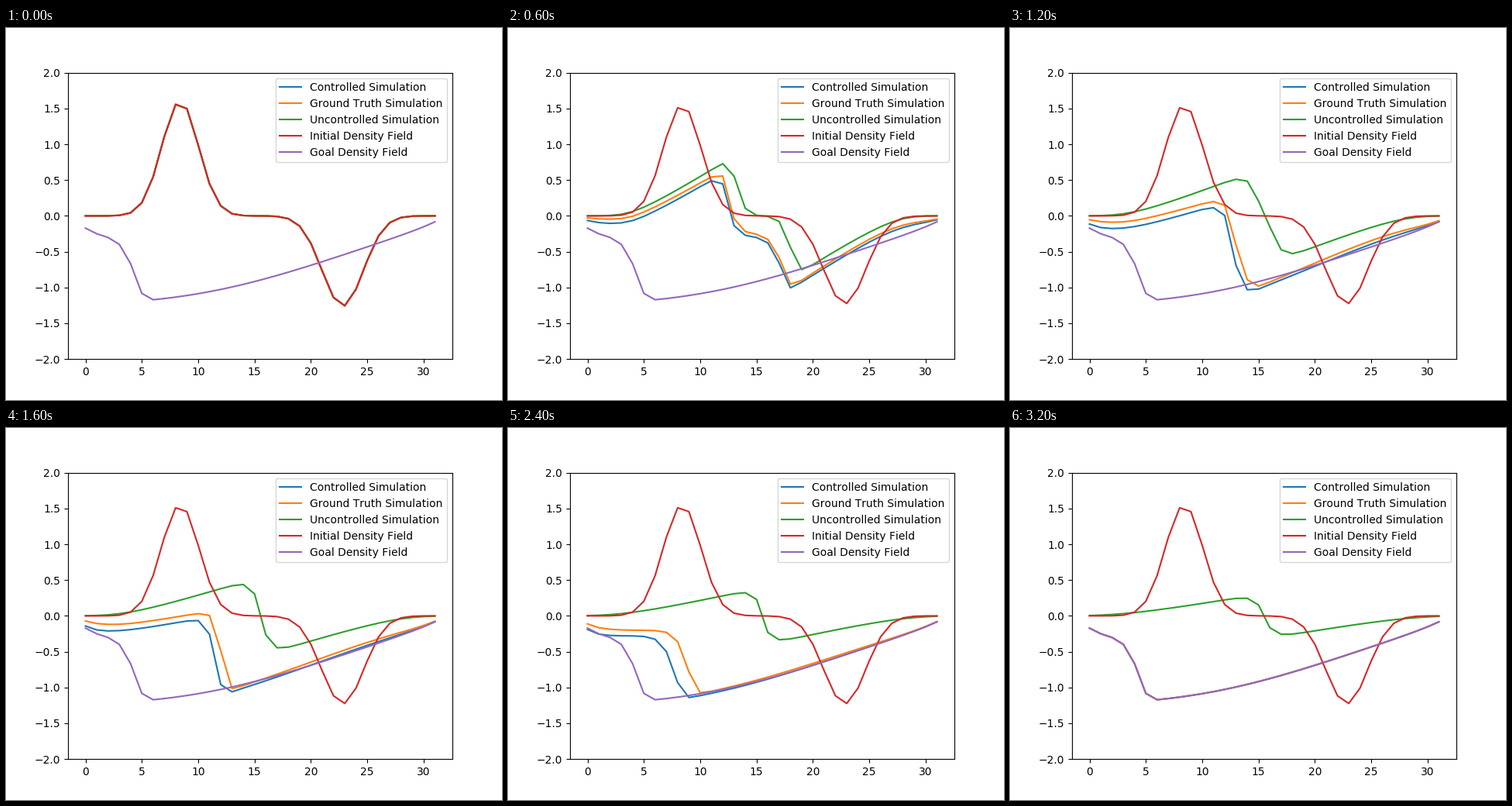
Recreate the animation shown at these times as a matplotlib script. Size 640x480 px, loop 3300 ms.

```python
import numpy as np
import matplotlib.pyplot as plt
from matplotlib.animation import FuncAnimation

plt.rcParams["text.kerning_factor"] = 6  # wider letter spacing

# Viscous Burgers equation on 32 cells, semi-Lagrangian steps
N, STEPS = 32, 32
DT, VISCOSITY = 0.03, 0.003
X = np.arange(N)
PAD_X = np.arange(-1, N + 1)


def bell(amp, center, sigma):
    return amp * np.exp(-0.5 * ((X - center) / sigma) ** 2)


def diffuse(u):
    p = np.pad(u, 1)
    return u + DT * VISCOSITY * N**2 * (p[:-2] - 2 * u + p[2:])


def advect(u):
    return np.interp(X - DT * N * u, PAD_X, np.pad(u, 1))


def simulate(u, force):
    states = [u]
    for step in range(STEPS):
        states.append(advect(diffuse(states[-1] + force(step))))
    return np.array(states)


start = bell(1.603, 8.397, 1.63) + bell(-1.261, 22.822, 1.83)
push = bell(-0.0415, 16.85, 8.45)
early_push = bell(-0.018, 7.5, 6) + bell(-0.012, 25, 3.5)


def control(step):
    """The true force plus an early extra push that fades out."""
    return push + early_push * max(0, 1 - step / 16)


truth = simulate(start, lambda step: push)
free = simulate(start, lambda step: 0)
controlled = simulate(start, control)

# The controller settles on the goal over the last quarter
settle = np.clip(np.arange(STEPS + 1) / 8 - 3, 0, 1)[:, None]
controlled += settle * (truth - controlled)

series = {
    "Controlled Simulation": controlled,
    "Ground Truth Simulation": truth,
    "Uncontrolled Simulation": free,
    "Initial Density Field": [start] + [diffuse(start)] * STEPS,
    "Goal Density Field": [truth[-1]] * (STEPS + 1),
}

fig, ax = plt.subplots(figsize=(6.4, 4.8), dpi=100)
lines = [ax.plot(X, states[0], label=name)[0] for name, states in series.items()]
ax.set_ylim(-2, 2)
ax.legend(loc="upper right")


def update(step):
    for line, states in zip(lines, series.values()):
        line.set_ydata(states[step])
    return lines


anim = FuncAnimation(fig, update, frames=STEPS + 1, interval=100, repeat=True)
plt.show()
```
